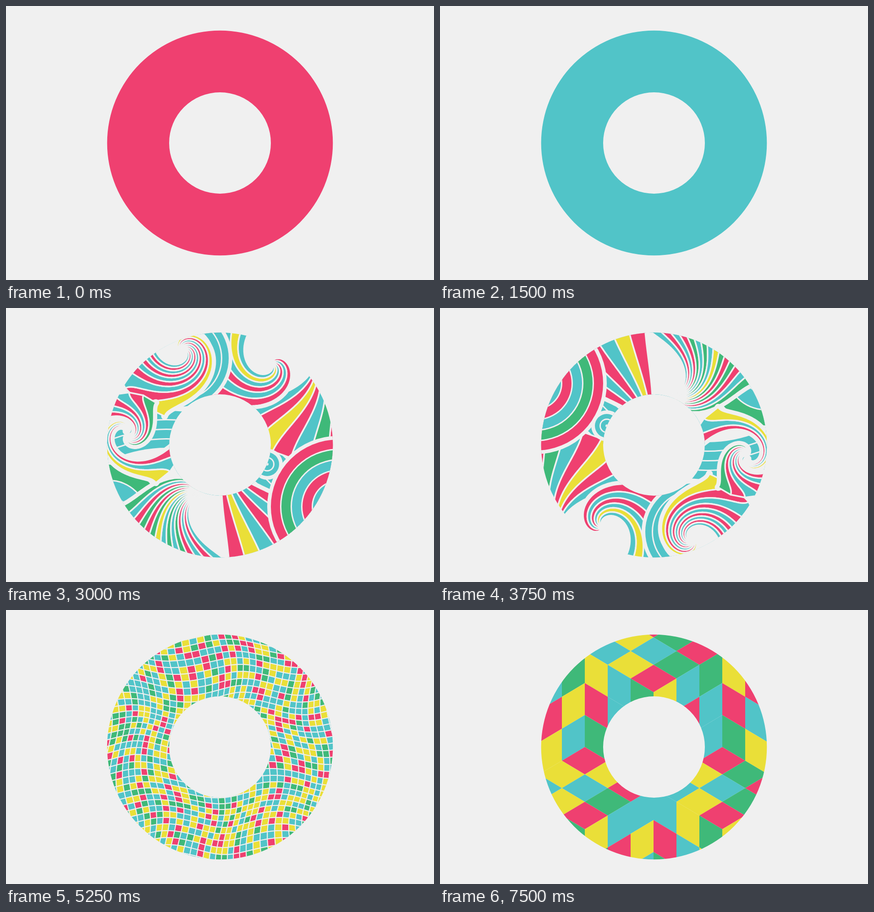
Animation, 934 px wide and 600 px high, one loop 8000 ms. Source, as an HTML page with a canvas:

```html
<!DOCTYPE html>
<html lang="en">
<head>
<meta charset="utf-8">
<title>Patterned ring</title>
<style>
  html, body { margin: 0; width: 100%; height: 100%; overflow: hidden; background: #f0f0f0; }
  canvas { display: block; }
</style>
</head>
<body>
<canvas width="934" height="600"></canvas>
<script>
const canvas = document.querySelector('canvas');
const ctx = canvas.getContext('2d');
const paper = '#f0f0f0';
const colors = { P: '#ef4070', Y: '#eadf38', T: '#51c4c8', G: '#3fb979' };
const center = { x: 467, y: 300 };
const STEP = 750, LOOP = 8000;

function polygon(points, color, gap = 0) {
  ctx.beginPath();
  points.forEach(([x, y]) => ctx.lineTo(x, y));
  ctx.closePath();
  ctx.fillStyle = color;
  ctx.fill();
  if (gap) {
    ctx.strokeStyle = paper;
    ctx.lineWidth = gap;
    ctx.stroke();
  }
}

function disc(x, y, radius, color) {
  ctx.beginPath();
  ctx.arc(x, y, radius, 0, 2 * Math.PI);
  ctx.fillStyle = color;
  ctx.fill();
}

function solid(key) {
  ctx.fillStyle = colors[key];
  ctx.fillRect(0, 0, 934, 600);
}

// Concentric bands, listed from the outside in.
function rings(x, y, radius, width, keys) {
  disc(x, y, radius + 8, paper);
  [...keys].forEach((key, i) => {
    disc(x, y, radius - i * width, colors[key]);
    disc(x, y, radius - (i + 1) * width + 3, paper);
  });
}

// Bands between two angles (degrees) that twist together towards a centre.
function swirl(x, y, reach, from, to, twist, keys) {
  const edge = t => Array.from({ length: 61 }, (_, i) => {
    const r = i / 60;
    const angle = (from + (to - from) * t + twist * (1 - r) ** 2) * Math.PI / 180;
    return [x + reach * r * Math.cos(angle), y + reach * r * Math.sin(angle)];
  });
  const band = (a, b) => [...edge(a), ...edge(b).reverse()];
  const n = keys.length;
  polygon(band(0, 1), paper, 15);
  [...keys].forEach((key, i) => polygon(band(i / n, (i + 1) / n), colors[key], 3.4));
}

function swirls() {
  ctx.lineJoin = 'round';
  rings(350, 600, 375, 21, 'TTTT');
  swirl(675, 120, 215, 70, 150, -45, 'PGTPYPT');
  swirl(580, 122, 165, 150, 290, -240, 'PTPTYT');
  rings(380, 110, 106, 17, 'TT');
  swirl(385, 92, 150, 105, 290, -300, 'YPTPTPTPT');
  rings(225, 460, 117, 36, 'GT');
  swirl(472, 345, 215, 28, 86, 10, 'PTPTYP');
  swirl(425, 412, 190, 64, 172, 105, 'TPTPGTGTYGPGPTG');
  rings(725, 435, 147, 23, 'PGTPTG');
  rings(570, 342, 26, 13, 'TT');
  swirl(262, 270, 130, 8, 60, 280, 'PTY');
  swirl(266, 280, 95, -165, -50, 200, 'PTPTPG');
}

function waves() {
  const r = 43.85;
  solid('T');
  [...'GPYTGPYT'].forEach((key, band) => {
    ctx.beginPath();
    let x = 213 + (band - 4) * r, y = 349 - (band + 4) * r;
    for (let i = 0; i < 10; i++) {
      ctx.arc(x, y + r, r, -Math.PI / 2, 0);
      ctx.arc(x + 2 * r, y + r, r, Math.PI, Math.PI / 2, true);
      x += 2 * r;
      y += 2 * r;
    }
    ctx.lineTo(1500, y);
    ctx.lineTo(1500, -800);
    ctx.lineTo(-500, -800);
    ctx.fillStyle = colors[key];
    ctx.fill();
  });
}

function mosaic() {
  let seed = 41;
  const random = () => (seed = (seed * 16807) % 2147483647) / 2147483647;
  const corner = (i, j) => {
    const x = 190 + i * 14.5, y = 20 + j * 14;
    return [x + 11 * Math.sin(y / 42 + x / 110) + 3 * Math.sin(x / 31),
            y + 11 * Math.sin(x / 42 - y / 140) + 3 * Math.sin(y / 29 + 1)];
  };
  for (let j = 0; j < 40; j++) {
    for (let i = 0; i < 38; i++) {
      const pick = random();
      const key = pick < .33 ? 'T' : pick < .65 ? 'Y' : pick < .84 ? 'G' : 'P';
      polygon([corner(i, j), corner(i + 1, j), corner(i + 1, j + 1), corner(i, j + 1)], colors[key], 2);
    }
  }
}

function stripedCubes() {
  const w = 33.2, h = 57.25;
  const right = [2 * w, 0], up = [w, -h], down = [w, h], back = [-w, -h];
  const tile = (x, y, along, across, keys) => [...keys].forEach((key, k) => {
    const mid = .07 + .1717 * k;
    const at = (a, b) => [x + along[0] * a + across[0] * b, y + along[1] * a + across[1] * b];
    polygon([at(.06, mid - .042), at(.94, mid - .042), at(.94, mid + .042), at(.06, mid + .042)], colors[key]);
  });
  ctx.translate(438, 156);
  ctx.rotate(.01);
  for (let i = -3; i <= 3; i++) {
    for (let j = -4; j <= 6; j++) {
      const x = 100 * i, y = h * i + 2 * h * j;
      tile(x, y, right, up, 'PGPYTG');
      tile(x, y, down, right, 'YPGTYP');
      tile(x, y, up, back, 'GTYPGT');
    }
  }
}

// A cube hanging from its top corner; each face is 3 x 3 tiles.
function cube(x, y, top, left, right) {
  const rise = [50, -30], fall = [50, 30], drop = [0, 70], slide = [-50, 30];
  const face = (x0, y0, u, v, keys) => [...keys].forEach((key, n) => {
    const at = (a, b) => [x0 + u[0] * a + v[0] * b, y0 + u[1] * a + v[1] * b];
    const i = n % 3, j = Math.floor(n / 3);
    polygon([at(i, j), at(i + 1, j), at(i + 1, j + 1), at(i, j + 1)], colors[key]);
  });
  face(x, y, fall, slide, top);
  face(x - 150, y + 90, fall, drop, left);
  face(x, y + 180, rise, drop, right);
}

function tiledCubes() {
  const top = 'PGPYTGTYP', left = 'YTGPTYGTY', right = 'YTGGPTYYT';
  cube(466, 0, top, left, right);
  cube(166, 0, top, left, 'YTGGPYPYT');
  cube(766, 0, top, 'YPGPTYGYT', right);
  cube(316, 300, 'PYPYTGTYP', left, 'YTTGPYYTT');
  cube(616, 300, top, 'TYGPTYGTY', right);
}

function turned(pattern) {
  ctx.translate(2 * center.x, 2 * center.y);
  ctx.scale(-1, -1);
  pattern();
}

const scenes = [
  () => solid('P'), () => solid('Y'), () => solid('T'), () => solid('G'),
  swirls, () => turned(swirls), waves, mosaic, () => turned(mosaic), stripedCubes, tiledCubes
];

function draw(scene) {
  ctx.fillStyle = paper;
  ctx.fillRect(0, 0, 934, 600);
  ctx.save();
  ctx.beginPath();
  ctx.arc(center.x, center.y, 246.3, 0, 2 * Math.PI);
  ctx.moveTo(center.x + 111, center.y);
  ctx.arc(center.x, center.y, 111, 0, 2 * Math.PI);
  ctx.clip('evenodd');
  scene();
  ctx.restore();
}

let shown = -1;
const start = performance.now();
function tick() {
  const index = Math.floor((performance.now() - start) % LOOP / STEP);
  if (index !== shown) draw(scenes[shown = index]);
  requestAnimationFrame(tick);
}
tick();
</script>
</body>
</html>
```
